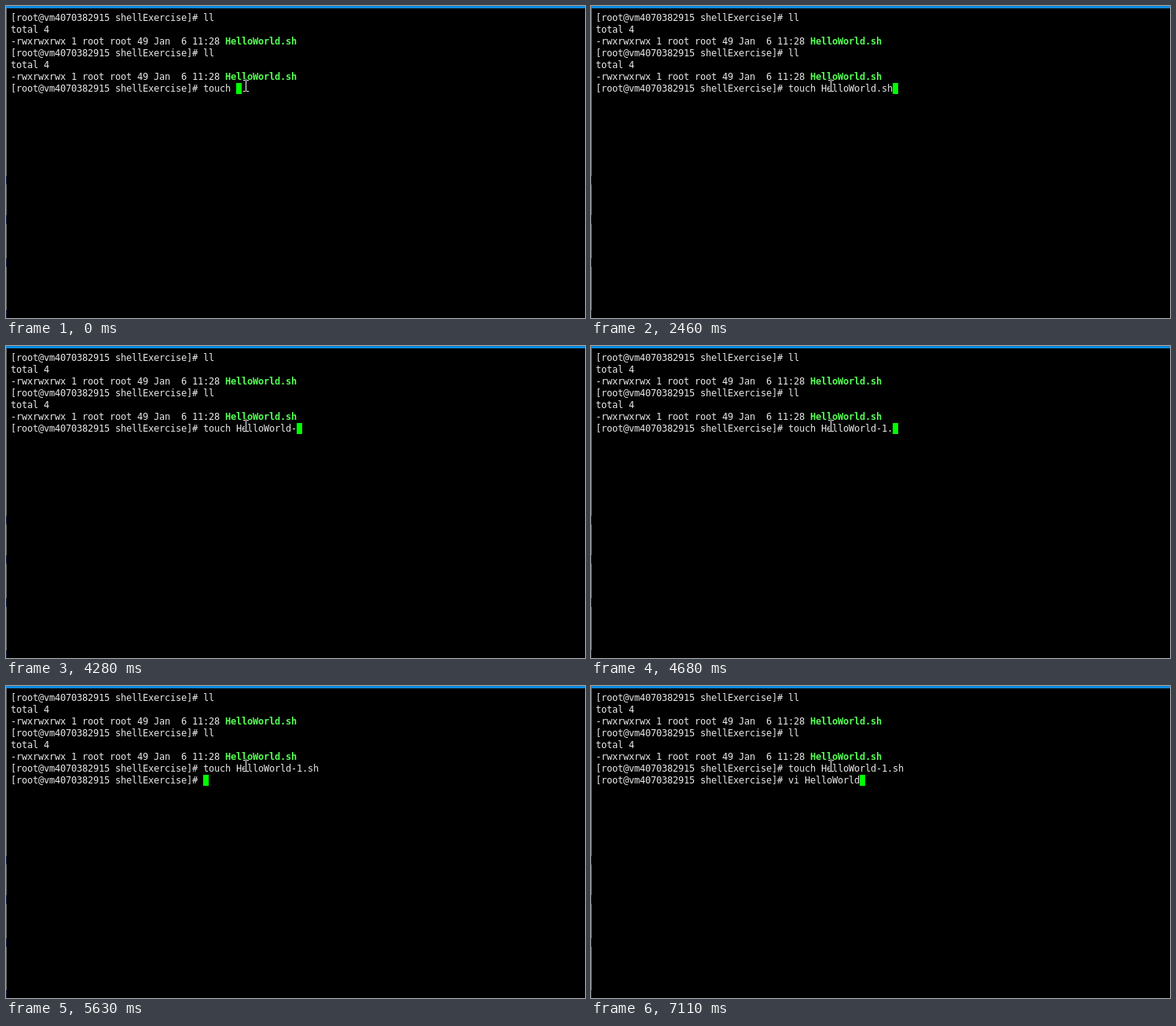
Recreate the animation shown at these times as an HTML page. Size 737 px wide and 397 px high, loop 8000 ms.

```html
<!DOCTYPE html>
<html lang="en">
<head>
<meta charset="utf-8">
<title>Terminal session</title>
<style>
  html, body { margin: 0; width: 100%; height: 100%; overflow: hidden; background: #000; }
  #stage { position: relative; width: 737px; height: 397px; overflow: hidden; background: #000; }
  #bar { position: absolute; left: 0; top: 0; width: 737px; height: 3px; background: #0a8ade; }
  #edge { position: absolute; left: 0; top: 3px; width: 1px; height: 394px; background: #6c6c6c; }
  #edge i { position: absolute; left: 0; width: 1px; height: 11px; background: #182648; }
  #screen {
    position: absolute; left: 6px; top: 8px;
    font: 12px/14px "DejaVu Sans Mono", monospace;
    letter-spacing: calc(7px - 1ch); /* 7px terminal cell */
    color: #e8e8e8;
  }
  .row { height: 14px; margin-bottom: 1px; white-space: pre; }
  b { color: #55ff55; }
  .cursor { display: inline-block; width: 7px; height: 14px; vertical-align: top; background: #00ff00; }
  #pointer { position: absolute; left: 300px; top: 92px; }
</style>
</head>
<body>
<div id="stage">
  <div id="bar"></div>
  <div id="edge">
    <i style="top:213px"></i><i style="top:263px"></i><i style="top:318px"></i><i style="top:384px"></i>
  </div>
  <div id="screen"></div>
  <svg id="pointer" width="11" height="19" fill="none" shape-rendering="crispEdges">
    <path id="beam" d="M2 2.5H5M6 2.5H9M5.5 3V16M2 16.5H5M6 16.5H9" stroke="#000" stroke-width="3"/>
    <path d="M2 2.5H5M6 2.5H9M5.5 3V16M2 16.5H5M6 16.5H9" stroke="#fff"/>
  </svg>
</div>
<script>
  const LOOP = 8000;
  const PROMPT = '[root@vm4070382915 shellExercise]# ';
  const LISTING = PROMPT + 'll\ntotal 4\n-rwxrwxrwx 1 root root 49 Jan  6 11:28 <b>HelloWorld.sh</b>\n';
  const TOUCH = 'touch HelloWorld';

  // [start time, text typed after the first prompt]
  const steps = [
    [0, 'touch '],
    [590, 'touch H'],
    [840, TOUCH + '.sh '],
    [2460, TOUCH + '.sh'],
    [2610, TOUCH + '.s'],
    [2760, TOUCH + '.'],
    [2880, TOUCH],
    [4280, TOUCH + '-'],
    [4400, TOUCH + '-1'],
    [4680, TOUCH + '-1.'],
    [4800, TOUCH + '-1.s'],
    [4920, TOUCH + '-1.sh'],
    ...[[5630, ''], [6340, 'v'], [6460, 'vi'], [6580, 'vi '], [6860, 'vi H'], [7110, 'vi HelloWorld']]
      .map(([at, text]) => [at, TOUCH + '-1.sh\n' + PROMPT + text])
  ];

  const screen = document.getElementById('screen');
  let shown;

  function render(time) {
    const step = steps.findLast(([at]) => at <= time);
    if (step === shown) return;
    shown = step;
    const text = LISTING + LISTING + PROMPT + step[1] + '<span class="cursor"></span>';
    screen.innerHTML = text.split('\n').map(line => `<div class="row">${line}</div>`).join('');
  }

  const start = performance.now();
  function tick() {
    render((performance.now() - start) % LOOP);
    requestAnimationFrame(tick);
  }
  tick();
</script>
</body>
</html>
```
